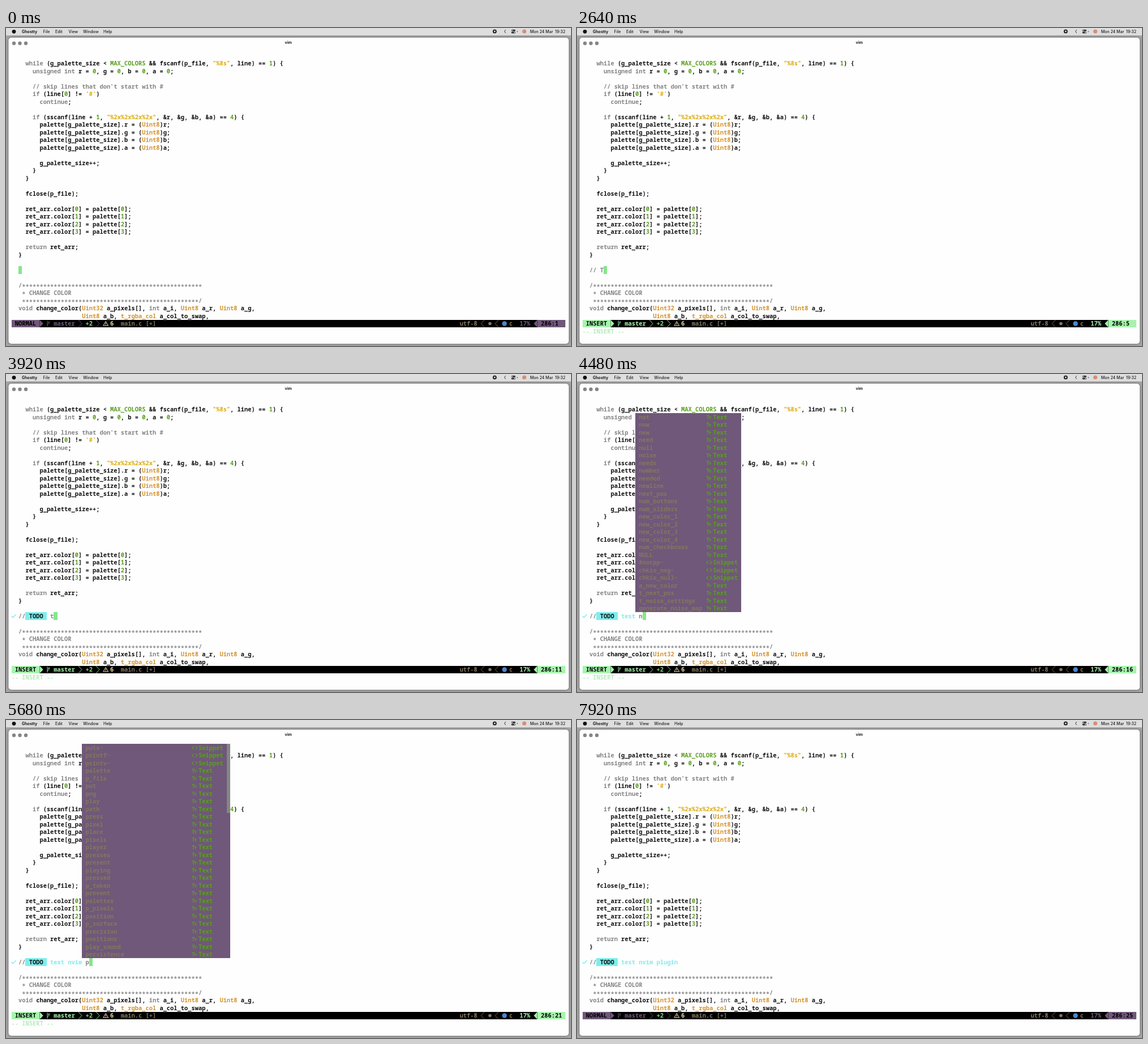
An HTML page with a canvas that plays this animation: 998x561 px, repeating every 8 s.

```html
<!DOCTYPE html>
<html lang="en">
<head>
<meta charset="utf-8">
<title>Editor session</title>
<style>
  html, body { margin: 0; width: 100%; height: 100%; overflow: hidden; background: #a6a6a6; }
  canvas { display: block; width: 998px; height: 561px; }
</style>
</head>
<body>
<canvas id="stage" width="998" height="561"></canvas>
<script>
const ctx = document.getElementById('stage').getContext('2d');
const LOOP = 8000, CW = 6.235, LH = 13.5;
const MONO = '600 10.39px "Noto Sans Mono", "DejaVu Sans Mono", monospace';
const UI = 'Inter, "Liberation Sans", sans-serif';
const C = {
  ink: '#101010', gray: '#858585', green: '#5a9f1c', orange: '#d5932f', yellow: '#dcae16',
  cyan: '#80ecec', badge: '#7eeeee', cursor: '#85e68b', insert: '#a7f3ae', purple: '#6f5879', dim: '#82775f'
};

const CODE = [
  '  while (g_palette_size < MAX_COLORS && fscanf(p_file, "%8s", line) == 1) {',
  '    unsigned int r = 0, g = 0, b = 0, a = 0;',
  '',
  "    // skip lines that don't start with #",
  "    if (line[0] != '#')",
  '      continue;',
  '',
  '    if (sscanf(line + 1, "%2x%2x%2x%2x", &r, &g, &b, &a) == 4) {',
  ...[...'rgba'].map(k => `      palette[g_palette_size].${k} = (Uint8)${k};`),
  '',
  '      g_palette_size++;',
  '    }',
  '  }',
  '',
  '  fclose(p_file);',
  '',
  ...[0, 1, 2, 3].map(i => `  ret_arr.color[${i}] = palette[${i}];`),
  '',
  '  return ret_arr;',
  '}',
  '', '', '',
  '/' + '*'.repeat(51),
  ' * CHANGE COLOR',
  ' ' + '*'.repeat(50) + '/',
  'void change_color(Uint32 a_pixels[], int a_i, Uint8 a_r, Uint8 a_g,',
  ' '.repeat(18) + 'Uint8 a_b, t_rgba_col a_col_to_swap,'
];
const TOKENS = /(\/\/.*|^ ?[\/*].*|\b(?:while|if|continue|return|unsigned|int|void)\b)|("[^"]*"|'#')|(\b(?:Uint8|Uint32|t_rgba_col)\b)|(\b\d+\b|MAX_COLORS)/g;
const TOKEN_COLORS = [C.gray, C.yellow, C.orange, C.green];

const EDIT_ROW = 27;
const TEXT = '// TODO: test nvim plugin';
const INSERT_AT = 1280, ESCAPE_AT = 7300, MENU_DELAY = 70, TINT_DELAY = 190;
const KEYS = [
  1880, 2040, 2280, 2560, 2700, 2860, 3030, 3280, 3520, 3880, 3970, 4030, 4080,
  4230, 4320, 5110, 5200, 5340, 5500, 5600, 6000, 6320, 6660, 6880, 7100
];
const WORDS = {
  n: 'not now new need null noise needs number needed newline next_pos num_buttons num_sliders new_color_1 new_color_2 new_color_3 new_color_4 num_checkboxes NULL #nocpp~ chkio_neg~ chkio_null~ a_new_color t_next_pos t_noise_settings generate_noise_map'.split(' '),
  p: 'puts~ printf~ printv~ palette p_file put png play path press pixel place pixels player presses present playing pressed p_token prevent palettes p_pixels position p_surface precision positions play_sound persistence placement_count_again'.split(' ')
};

const colX = c => 22 + c * CW;
const rowY = r => 55.75 + r * LH;

function rect(x, y, w, h, color) {
  ctx.fillStyle = color;
  ctx.fillRect(x, y, w, h);
}

// Fill whole cells, snapped to pixels
function cells(col, row, w, h, color) {
  const x = Math.round(colX(col)), y = Math.round(rowY(row));
  rect(x, y, Math.round(colX(col + w)) - x, Math.round(rowY(row + h)) - y, color);
}

function put(s, col, row, color) {
  ctx.font = MONO;
  ctx.textAlign = 'left';
  ctx.fillStyle = color;
  [...s].forEach((ch, i) => {
    if (ch !== ' ') ctx.fillText(ch, colX(col + i), rowY(row) + 10.4 + (ch === '*' ? 2 : 0));
  });
}

function label(s, x, y, weight = 500, size = 7, align = 'left') {
  ctx.font = `${weight} ${size}px ${UI}`;
  ctx.textAlign = align;
  ctx.fillStyle = '#1c1c1c';
  ctx.fillText(s, x, y);
}

function dot(x, y, r, color) {
  ctx.fillStyle = color;
  ctx.beginPath();
  ctx.arc(x, y, r, 0, 7);
  ctx.fill();
}

// Each path is a flat list of x, y pairs relative to (x, y)
function lines(x, y, color, width, ...paths) {
  ctx.strokeStyle = color;
  ctx.lineWidth = width;
  ctx.beginPath();
  for (const p of paths)
    for (let i = 0; i < p.length; i += 2)
      ctx[i ? 'lineTo' : 'moveTo'](x + p[i], y + p[i + 1]);
  ctx.stroke();
}

function wedge(col, dir, color) {
  const x = colX(dir > 0 ? col : col + 1), y = rowY(34);
  ctx.fillStyle = color;
  ctx.beginPath();
  ctx.moveTo(x, y);
  ctx.lineTo(x + dir * CW, y + LH / 2);
  ctx.lineTo(x, y + LH);
  ctx.fill();
}

function chevron(col, dir, color) {
  const x = colX(dir > 0 ? col : col + 1);
  lines(x, rowY(34), color, 0.9, [0, 0.5, dir * 6, 6.75, 0, 13]);
}

function desktop() {
  rect(0, 0, 998, 561, '#a6a6a6');
  rect(0, 0, 998, 13, '#dedede');
  ctx.save();
  ctx.shadowColor = 'rgba(0,0,0,.4)';
  ctx.shadowBlur = 5;
  ctx.fillStyle = '#fefefe';
  ctx.beginPath();
  ctx.roundRect(4.5, 17, 989.5, 540, 5);
  ctx.fill();
  ctx.restore();

  dot(14, 6.3, 3.4, '#111');
  label('Ghostty', 28, 8.5, 700);
  [['File', 65.5], ['Edit', 87], ['View', 110.5], ['Window', 136.3], ['Help', 172]]
    .forEach(([s, x]) => label(s, x, 8.5));
  label('Mon 24 Mar  19:32', 988, 8.5, 500, 7, 'right');

  dot(863.2, 6, 3.5, '#222');
  dot(863.2, 6, 1.4, '#dedede');
  lines(880, 6, '#222', 0.9, [2.6, -3, 0.5, 0, 2.6, 3]);
  ctx.fillStyle = '#333';
  ctx.beginPath();
  ctx.roundRect(892.5, 2.8, 7.5, 3, 1.5);
  ctx.roundRect(892.5, 6.5, 7.5, 3, 1.5);
  ctx.fill();
  dot(894.2, 4.3, 0.9, '#dedede');
  dot(898.3, 8, 0.9, '#dedede');
  dot(903.2, 6.2, 1, '#7a4fc0');
  dot(915.5, 6, 3.6, '#d58d7c');

  [14, 24.5, 35].forEach(x => dot(x, 27, 3.2, '#858585'));
  label('vim', 498.7, 28.4, 700, 7, 'center');
}

function code() {
  CODE.forEach((line, row) => {
    let end = 0;
    for (const m of line.matchAll(TOKENS)) {
      put(line.slice(end, m.index), end, row, C.ink);
      put(m[0], m.index, row, TOKEN_COLORS[m.slice(1).findIndex(Boolean)]);
      end = m.index + m[0].length;
    }
    put(line.slice(end), end, row, C.ink);
  });
}

const typedAt = t => KEYS.filter(k => k <= t).length;

function editLine(t, n) {
  if (n < 8) return put(TEXT.slice(0, n), 0, EDIT_ROW, C.gray);
  put('//', 0, EDIT_ROW, C.gray);
  cells(2, EDIT_ROW, 6, 1, C.badge);
  put('TODO', 3, EDIT_ROW, C.ink);
  lines(13.5, 427, C.cyan, 1.4, [-4, 0, -1.3, 2.7, 4, -3]);
  const tinted = Math.max(8, typedAt(t - TINT_DELAY));
  put(TEXT.slice(8, tinted), 8, EDIT_ROW, C.cyan);
  put(TEXT.slice(tinted, n), tinted, EDIT_ROW, C.gray);
}

function cursor(t, n) {
  const last = Math.max(0, ...[INSERT_AT, ESCAPE_AT, ...KEYS].filter(k => k <= t));
  if ((t - last) % 1200 >= 600) return;
  const col = t >= ESCAPE_AT ? n - 1 : n;
  cells(col, EDIT_ROW, 1, 1, C.cursor);
  if (col < n) put(TEXT[col], col, EDIT_ROW, C.ink);
}

// Completion list: a fuzzy filter over the words for the first letter
function menu(t) {
  if (t >= ESCAPE_AT) return;
  const text = TEXT.slice(0, typedAt(t - MENU_DELAY));
  const query = text.split(' ').pop();
  if (!query || !WORDS[query[0]] || text.length < 10) return;
  const fuzzy = new RegExp([...query].join('.*'), 'i');
  const items = WORDS[query[0]].filter(w => fuzzy.test(w)).slice(0, 28);
  if (!items.length) return;

  const scrolls = items.length === 28;
  const col = text.length - query.length - 1;
  const row = items.length > 5 ? EDIT_ROW - items.length : EDIT_ROW + 1;
  const nameW = scrolls ? 29 : Math.max(...items.map(w => w.length));
  const kindW = items.some(w => w.endsWith('~')) ? 7 : 4;
  cells(col, row, nameW + kindW + 5 + scrolls, items.length, C.purple);
  if (scrolls) cells(col + nameW + kindW + 5, row, 1, 9, '#858585');

  items.forEach((word, i) => {
    const r = row + i, iconCol = col + nameW + 2;
    const x = colX(iconCol), y = rowY(r) + 6.75, snippet = word.endsWith('~');
    put(word, col + 1, r, C.dim);
    put(snippet ? 'Snippet' : 'Text', iconCol + 2, r, C.green);
    if (snippet) lines(x, y, C.green, 1.1, [4.3, -3.2, 1, 0, 4.3, 3.2], [7, -3.2, 10.3, 0, 7, 3.2]);
    else lines(x, y, C.green, 1.3, [0.8, -2.8, 6, -2.8], [3.4, -2.8, 3.4, 3.4], [5.2, -0.3, 9.4, -0.3], [7.3, -0.3, 7.3, 3.4]);
  });
}

function status(t, n) {
  const normal = t < INSERT_AT || t >= ESCAPE_AT;
  const tone = normal ? C.purple : C.insert;
  const pos = t >= ESCAPE_AT ? n : n + 1;
  const y = rowY(34) + 6.75;

  cells(-2, 34, 157, 1, '#000');
  cells(-2, 34, 8, 1, tone);
  put(normal ? 'NORMAL' : 'INSERT', -1, 34, '#000');
  wedge(6, 1, tone);
  lines(colX(8), y, tone, 1, [1.2, -5, 1.2, 5], [1.2, 2, 4, 0, 4, -3], [2.7, -2, 4, -3.6, 5.3, -2]);
  put('master', 10, 34, tone);
  chevron(17, 1, tone);
  put('+2', 19, 34, '#84d885');
  chevron(22, 1, tone);
  lines(176.2, y, '#eddcaa', 1, [0, -4, 4.4, 3.6, -4.4, 3.6, 0, -4], [0, -1.5, 0, 1.2], [0, 2, 0, 3]);
  put('6', 26, 34, '#eddcaa');
  put('main.c [+]', 29, 34, C.dim);

  put('utf-8', 125, 34, C.dim);
  chevron(131, -1, C.dim);
  dot(854.8, y, 2.8, C.dim);
  chevron(135, -1, C.dim);
  dot(880.5, y, 4.2, '#4c86cf');
  put('c', 139, 34, C.dim);
  put('17%', 142, 34, tone);
  wedge(146, -1, tone);
  cells(147, 34, 8, 1, tone);
  put('286:' + pos, 148, 34, '#000');
  if (!normal) put('-- INSERT --', -2, 35, '#b4edb9');
}

function draw(now) {
  const t = now % LOOP, n = typedAt(t);
  desktop();
  code();
  editLine(t, n);
  cursor(t, n);
  menu(t);
  status(t, n);
  requestAnimationFrame(draw);
}
requestAnimationFrame(draw);
</script>
</body>
</html>
```
